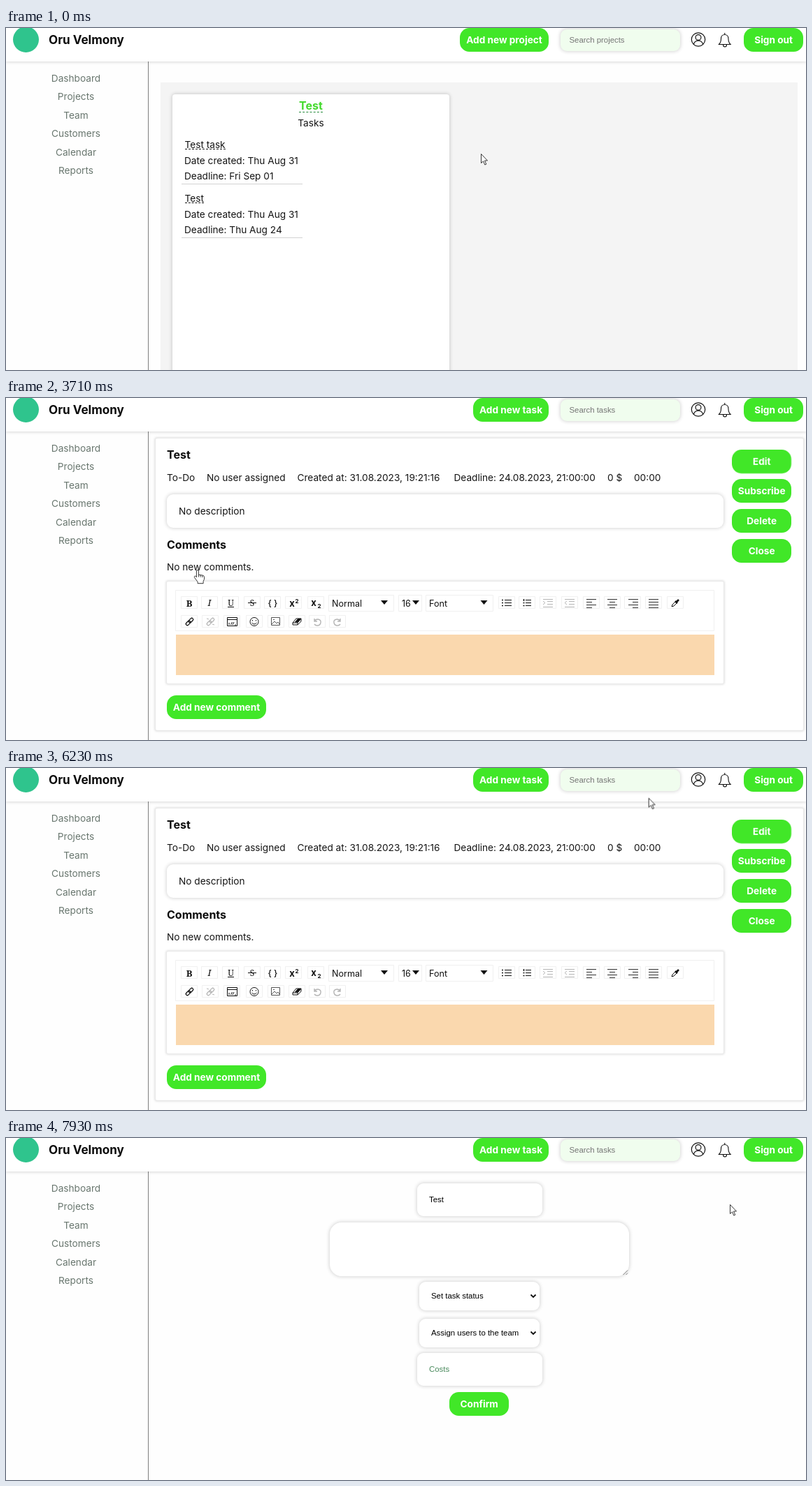
An HTML page that plays this animation: 1144x490 px, repeating every 8000 ms.

```html
<!DOCTYPE html>
<html lang="en">
<head>
<meta charset="utf-8">
<title>Task board</title>
<style>
  html, body { margin: 0; width: 100%; height: 100%; overflow: hidden; background: #fefefe; }
  body { position: relative; font: 400 13.65px/16px Inter, sans-serif; color: #151515; white-space: nowrap; }
  body *, .page { position: absolute; box-sizing: border-box; }
  svg { inset: 0; overflow: visible; }
  svg * { position: static; }
  .page { inset: 0; }
  h1, h2, h3 { margin: 0; font-weight: 700; line-height: 20px; color: #0c0c0c; }
  h1 { font-size: 17.07px; }
  h2, h3 { font-size: 16px; }

  header { left: 0; top: 0; width: 1144px; height: 48px; background: #fff; box-shadow: 0 0 5px rgba(0, 0, 0, .22); }
  .mark { left: 10px; top: -2px; width: 37px; height: 37px; border-radius: 50%; background: #2fc48d; }
  nav { left: 0; top: 48px; width: 204px; height: 442px; border-right: 1px solid #808080; background: #fefefe; }
  nav p { left: 0; top: 10.75px; width: 200px; margin: 0; line-height: 26.5px; text-align: center; white-space: pre-line; color: #68766e; }

  .btn { height: 34.1px; width: 85.3px; border-radius: 13.6px; background: #41e728; color: #fff; font-weight: 700; line-height: 34px; text-align: center; }
  .box { background: #fff; box-shadow: 0 0 5px 1px rgba(0, 0, 0, .16); border-radius: 9px; }
  .field { font: 11.38px/16px "Liberation Sans", Arial, sans-serif; padding-left: 17px; color: #000; }
  .search { left: 793px; top: 2px; width: 171px; height: 31px; padding-left: 12.5px; line-height: 31px; background: #f0fdee; color: #757575; }

  .panel { left: 221px; top: 78px; width: 911px; height: 412px; background: #f4f4f4; }
  .card { left: 238px; top: 95px; width: 395.5px; height: 410px; border-radius: 4px; }
  .link { height: 15px; border-bottom: 1px dashed currentColor; }
  .green { left: 419px; top: 103px; height: 18px; line-height: 16px; color: #45da2e; border-color: #268a3c; }
  .rule { left: 251px; width: 173px; height: 1px; background: #d2d2d2; }
  .frame { border-radius: 2px; box-shadow: 0 0 3px 2px rgba(0, 0, 0, .1); }
  .ink { left: 242.5px; top: 338.5px; width: 770px; height: 58.5px; background: #fad8ae; }

  /* One loop is 8 s, so 1% is 80 ms. */
  .list, .task, .form, .bar, .arrow, .hand, .beam, .click { animation: 8s step-end infinite; }
  .list { animation-name: list; }
  .task { animation-name: task; }
  .form { animation-name: form; }
  .bar { animation-name: bar; }
  .arrow { animation-name: arrow; }
  .hand { animation-name: hand; }
  .beam { animation-name: beam; }
  .click { animation-name: click; }
  .hover { animation: hover 8s infinite; }
  .grow { animation: grow 8s infinite; }
  .pointer { animation: move 8s steps(2, start) infinite; }
  @keyframes list { 0% { opacity: 1 } 46.375%, 100% { opacity: 0 } }
  @keyframes bar { 0% { opacity: 0 } 46.375%, 100% { opacity: 1 } }
  @keyframes task { 0%, 89%, 100% { opacity: 0 } 46.375% { opacity: 1 } }
  @keyframes form { 0% { opacity: 0 } 89%, 100% { opacity: 1 } }
  @keyframes arrow { 0%, 58.375%, 87.25%, 100% { opacity: 1 } 31.625%, 79.75% { opacity: 0 } }
  @keyframes hand { 0%, 47.25%, 87.25%, 100% { opacity: 0 } 31.625%, 79.75% { opacity: 1 } }
  @keyframes beam { 0%, 58.375%, 100% { opacity: 0 } 47.25% { opacity: 1 } }
  @keyframes click { 0%, 39%, 87.25%, 100% { opacity: 0 } 38.25%, 86.375% { opacity: 1 } }
  @keyframes hover { 0%, 31.625% { color: #151515 } 36.375%, 100% { color: #41e728 } }
  @keyframes grow { 0%, 79.75% { transform: none } 82.25%, 100% { transform: scale(1.1) } }
  @keyframes move {
    0%, 16% { transform: translate(679px, 180px) }
    17.75% { transform: translate(674px, 184px); animation-timing-function: steps(8, start) }
    24.75% { transform: translate(340px, 240px) }
    26.5% { transform: translate(318px, 246px) }
    28.25%, 29.875% { transform: translate(301px, 246px); animation-timing-function: steps(3, start) }
    32.5% { transform: translate(274px, 246px); animation-timing-function: step-end }
    47.25%, 54.875% { transform: translate(275px, 247px) }
    56.625% { transform: translate(290px, 245px); animation-timing-function: steps(9, start) }
    64% { transform: translate(540px, 224px) }
    65.75% { transform: translate(565px, 220px); animation-timing-function: steps(3, start) }
    68.375% { transform: translate(699px, 192px); animation-timing-function: steps(4, start) }
    71.875% { transform: translate(978px, 140px); animation-timing-function: steps(5, start) }
    76.25% { transform: translate(806px, 102px); animation-timing-function: steps(3, start) }
    78.875% { transform: translate(975px, 13px) }
    80.625% { transform: translate(1048px, 82px); animation-timing-function: step-end }
    99.125%, 100% { transform: translate(1035px, 95px) }
  }
</style>
</head>
<body>
<div class="page list">
  <div class="panel"></div>
  <div class="box card"></div>
  <h2 class="link green">Test</h2>
  <div style="left:238px;top:128px;width:396px;text-align:center">Tasks</div>
  <div class="link" style="left:255.5px;top:159px">Test task</div>
  <div style="left:255px;top:182px">Date created: Thu Aug 31</div>
  <div style="left:255px;top:204px">Deadline: Fri Sep 01</div>
  <div class="rule" style="top:223px"></div>
  <div class="link hover" style="left:255.5px;top:236px">Test</div>
  <div style="left:255px;top:259px">Date created: Thu Aug 31</div>
  <div style="left:255px;top:281px">Deadline: Thu Aug 24</div>
  <div class="rule" style="top:300px"></div>
</div>

<div class="page task">
  <div class="box frame" style="left:214px;top:58px;width:926px;height:418px"></div>
  <h3 style="left:230px;top:71px">Test</h3>
  <div style="left:230px;top:106px">To-Do</div>
  <div style="left:287px;top:106px">No user assigned</div>
  <div style="left:416.5px;top:106px">Created at: 31.08.2023, 19:21:16</div>
  <div style="left:640.5px;top:106px">Deadline: 24.08.2023, 21:00:00</div>
  <div style="left:860px;top:106px">0 $</div>
  <div style="left:898px;top:106px">00:00</div>
  <div class="box" style="left:230px;top:138px;width:796px;height:48px"></div>
  <div style="left:247px;top:154px">No description</div>
  <h3 style="left:230px;top:200px">Comments</h3>
  <div style="left:230px;top:234px">No new comments.</div>
  <div class="box frame" style="left:230px;top:263px;width:796px;height:146px"></div>
  <div class="ink"></div>
  <svg width="1144" height="490" fill="none" stroke="#111">
    <g id="cells" stroke="#f0f0f0">
      <path d="M242.5 275.5h770v58h-770zM461.5 282.5h93v23h-93zM561.5 282.5h33v23h-33zM600.5 282.5h96v23h-96z"/>
    </g>
    <g fill="#111" stroke="none" text-anchor="middle" font-family="Noto Serif, serif" font-size="13">
      <text x="262" y="298.5" font-weight="700">B</text>
      <text x="291" y="298" font-style="italic">I</text>
      <text x="321.5" y="297.5" font-size="12">U</text>
      <text x="352" y="298" font-size="12">S</text>
      <g font-family="Inter, sans-serif" font-weight="700">
        <text x="381.5" y="297.5" font-size="12" font-weight="500">{ }</text>
        <text x="409" y="299">x</text><text x="416" y="294" font-size="8">2</text>
        <text x="440" y="298">x</text><text x="448" y="300.5" font-size="8">2</text>
      </g>
      <g font-family="Inter, sans-serif" font-size="12.6" text-anchor="start">
        <text x="466" y="298.5">Normal</text><text x="566" y="298.5">16</text><text x="605" y="298.5">Font</text>
      </g>
      <path d="M536 290h10l-5 6zM581 290h10l-5 6zM678.500 290h10l-5 6z"/>
    </g>
    <path d="M317 299.500h9M346 293.500h12"/>
    <path d="M713 289.500h10M713 293.500h10M713 297.500h10M743 289.500h8M743 293.500h8M743 297.500h8"/>
    <path d="M709 289.500h2M709 293.500h2M709 297.500h2M740.500 288v3M739.500 293.500h2M739.500 297.500h2" stroke-width="1.500"/>
    <g stroke="#b5b5b5">
      <path d="M768 288.500h14M774 291.500h8M774 295.500h8M768 299.500h14M768 291l3 2.500-3 2.500"/>
      <path d="M799 288.500h14M805 291.500h8M805 295.500h8M799 299.500h14M802 291l-3 2.500 3 2.500"/>
    </g>
    <path stroke="#333" d="M830 288.500h14M830 292.500h8M830 296.500h14M830 300.500h8
      M860 288.500h14M863 292.500h8M860 296.500h14M863 300.500h8
      M890 288.500h14M896 292.500h8M890 296.500h14M896 300.500h8
      M919 288.500h14M919 292.500h14M919 296.500h14M919 300.500h14"/>
    <path d="M952 299l1-3 4-4 2 2-4 4z"/>
    <path d="M957 291l3 3M958 293l4-4" stroke-width="2.600"/>
    <g id="chain" stroke-width="1.300">
      <rect x="-6.500" y="-2" width="7.500" height="4" rx="2" transform="translate(262.500 320.500) rotate(-45)"/>
      <rect x="-1" y="-2" width="7.500" height="4" rx="2" transform="translate(262.500 320.500) rotate(-45)"/>
    </g>
    <g stroke="#b5b5b5">
      <use href="#chain" x="30"/>
      <path d="M287 316l3 1M295 324l3 1"/>
      <path d="M441 316v4h4M441 320c3-5 10-3 9 2-1 5-7 5-9 2" stroke-width="1.400"/>
      <path d="M478 316v4h-4M478 320c-3-5-10-3-9 2 1 5 7 5 9 2" stroke-width="1.400"/>
    </g>
    <path d="M316.500 314.500h14v12h-14zM316.500 317.500h14M319 322v3M321.500 325l2-4M324 325l2-4M327 325h2"/>
    <circle cx="355" cy="320.500" r="6"/>
    <path d="M352.500 318v1.500M357.500 318v1.500M351.500 322q3.500 4 7 0"/>
    <path stroke="#555" d="M379.500 314.500h12v11h-12zM380 324l4-4 3 3 2-2 2 3M382 317.500h2"/>
    <path d="M410 322l5-6h7l-5 6zM410 322v3h7l5-5v-4M417 322v3"/>
    <path d="M413.500 321l4-4.500h4l-4 4.500z" fill="#111"/>
  </svg>
  <div class="btn" style="left:230px;top:426px;width:142px">Add new comment</div>
  <div class="btn grow" style="left:1038px;top:73.700px">Edit</div>
  <div class="btn" style="left:1038px;top:116.400px">Subscribe</div>
  <div class="btn" style="left:1038px;top:159px">Delete</div>
  <div class="btn" style="left:1038px;top:201.700px">Close</div>
</div>

<div class="page form">
  <div class="box field" style="left:588px;top:65px;width:179px;height:47px;line-height:47px">Test</div>
  <div class="box" style="left:463px;top:121px;width:428px;height:77px;border-radius:17px"></div>
  <div class="box field" style="left:591px;top:206px;width:172px;height:40.500px;line-height:40.500px">Set task status</div>
  <div class="box field" style="left:591px;top:259px;width:172px;height:40.500px;line-height:40.500px">Assign users to the team</div>
  <div class="box field" style="left:588px;top:308px;width:179px;height:47px;line-height:47px;color:#4a8a5d">Costs</div>
  <div class="btn" style="left:634px;top:363.500px">Confirm</div>
  <svg width="1144" height="490" fill="none" stroke="#111">
    <path d="M750.500 224.500l3.500 3.500 3.500-3.500M750.500 277.500l3.500 3.500 3.500-3.500" stroke-width="1.800"/>
    <path d="M882.500 196l6.500-6.500M886.500 196l2.500-2.500" stroke="#777"/>
  </svg>
</div>

<nav><p>Dashboard
Projects
Team
Customers
Calendar
Reports</p></nav>

<header>
  <div class="mark"></div>
  <h1 style="left:61px;top:7px">Oru Velmony</h1>
  <div class="page list">
    <div class="btn" style="left:649px;top:0;width:127px">Add new project</div>
    <div class="box field search">Search projects</div>
  </div>
  <div class="page bar">
    <div class="btn" style="left:668px;top:0;width:108px">Add new task</div>
    <div class="box field search">Search tasks</div>
  </div>
  <svg width="1144" height="48" fill="none" stroke="#111" stroke-width="1.200">
    <circle cx="990" cy="16.500" r="9.700"/>
    <circle cx="990" cy="13.500" r="3.900"/>
    <path d="M983.500 23.500c1-7 12-7 13 0"/>
    <path d="M1019.500 23.500c3-3 3-5 3-8 0-8 10.500-8 10.500 0 0 3 0 5 3 8zM1025.500 24c0 4 5 4 5 0M1027.800 9.500v-2.500" stroke-width="1.100"/>
  </svg>
  <div class="btn" style="left:1055px;top:0">Sign out</div>
</header>

<svg width="1144" height="490">
  <g class="pointer" fill="#fff" stroke="#222" stroke-width=".9" stroke-linejoin="round">
    <circle class="click" r="10" fill="#ff0" fill-opacity=".47" stroke="none"/>
    <path class="arrow" d="M.5.500V13.500l3-2.700 2.300 5.200 2-.9-2.300-5.100h4z"/>
    <g class="hand">
      <path d="M-1.600 2a1.500 1.500 0 0 1 3 0v5l6.300 1.200q1.800.5 1.800 2.500v3l-1.400 3v3h-8v-2.300l-4.300-5.700c-1.400-2 .5-3.400 1.700-2.200l.9 1.200z"/>
      <path d="M1.400 7v3.500M4.100 7.700v3M6.800 8.300v2.700" fill="none"/>
    </g>
    <path class="beam" d="M-2.500-6.500h2l.5.500.5-.5h2M0-6V6M-2.500 6.500h2L0 6l.5.500h2" fill="none"/>
  </g>
</svg>

<script>
  // Button cells of the editor toolbar, by centre.
  const rows = [
    [293, [262, 291, 321, 352, 381, 411, 443, 716, 745, 775, 806, 837, 867, 896, 926, 957]],
    [320, [262, 292, 323, 355, 386, 416, 445, 474]],
  ];
  const cell = y => x => `<path d="M${x - 11.5} ${y - 8.5}h23v17h-23z"/>`;
  document.getElementById('cells').innerHTML += rows.map(([y, xs]) => xs.map(cell(y)).join('')).join('');
</script>
</body>
</html>
```
